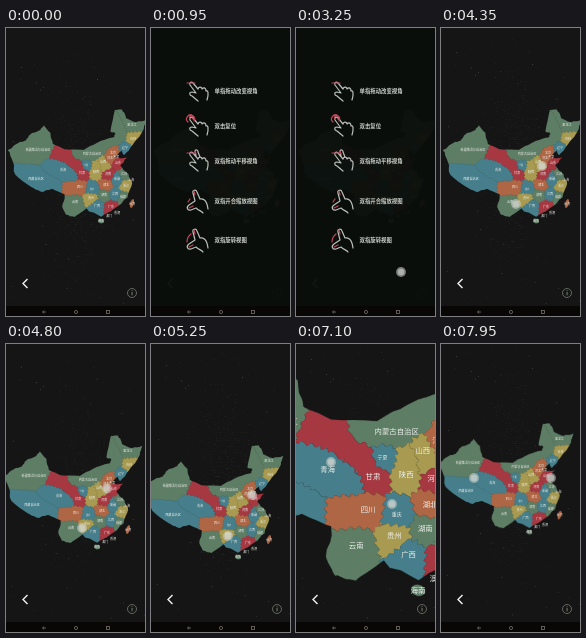
An HTML page with a canvas for the animation above (8 s loop, 139 px wide and 288 px high).

```html
<!DOCTYPE html>
<html lang="zh">
<head>
<meta charset="utf-8">
<title>地图手势</title>
<style>
html, body { margin: 0; width: 100%; height: 100%; overflow: hidden; background: #141514; }
canvas { display: block; width: 100vw; height: 100vh; }
</style>
</head>
<body>
<canvas id="stage"></canvas>
<script>
const W = 139, H = 288, LOOP = 8000;
const FONT = '"Noto Sans CJK SC", "Noto Sans CJK", sans-serif';
const GREEN = [94, 125, 101], BLUE = [70, 127, 139], RED = [166, 56, 66],
  ORANGE = [174, 102, 69], YELLOW = [168, 154, 80];
const canvas = document.getElementById('stage');
const ctx = canvas.getContext('2d');

let seed = 17;
function random() {
  seed = (seed * 16807) % 2147483647;
  return seed / 2147483647;
}
const spread = () => random() + random() + random() - 1.5;
const ramp = (t, from, to) => Math.min(1, Math.max(0, (t - from) / (to - from)));
const mix = (a, b, p) => a + (b - a) * p;
const within = (t, from, to) => t >= from && t <= to;
const toPoints = text => text.split(', ').map(pair => pair.split(' ').map(Number));

// Each province grows around a spine that starts at its label.
const provinces = [
  ['新疆维吾尔自治区', GREEN, '32 122, 42 120'],
  ['西藏自治区', BLUE, '30 151, 46 158'],
  ['青海', BLUE, '57 142, 48 139, 66 147'],
  ['甘肃', RED, '76 145, 70 135, 62 128, 51 124'],
  ['内蒙古自治区', GREEN, '86 126, 70 127, 86 126, 102 116, 113 108, 111 90'],
  ['宁夏', BLUE, '80 137'],
  ['陕西', YELLOW, '90 144, 91 138'],
  ['山西', YELLOW, '97 134, 98 139'],
  ['河北', ORANGE, '104 130, 106 122'],
  ['黑龙江', GREEN, '126 97, 116 87'],
  ['吉林', YELLOW, '127 111'],
  ['辽宁', BLUE, '119 120'],
  ['山东', RED, '112 135'],
  ['河南', RED, '102 146'],
  ['江苏', GREEN, '118 146'],
  ['安徽', BLUE, '111 151'],
  ['湖北', ORANGE, '100 157'],
  ['重庆', BLUE, '86 161'],
  ['四川', ORANGE, '74 159, 66 159'],
  ['云南', GREEN, '69 174, 62 178'],
  ['贵州', YELLOW, '85 170'],
  ['湖南', GREEN, '98 167'],
  ['江西', BLUE, '109 166'],
  ['浙江', YELLOW, '120 158'],
  ['福建', GREEN, '117 169'],
  ['广西', BLUE, '91 178'],
  ['广东', RED, '105 179']
].map(([name, color, spine]) => ({ name, color, spine: toPoints(spine) }));

const islands = [
  { name: '台湾', color: ORANGE, x: 126, y: 175.5, rx: 1.8, ry: 4.5 },
  { name: '海南', color: GREEN, x: 95, y: 193, rx: 3, ry: 2.3 }
];
const coast = toPoints('2 122, 14 114, 20 113, 24 106, 33 103, 38 98, 44 105, 47 116, 58 121, 78 122, 90 115, 108 109, 110 105, 104 103, 109 82, 116 81, 120 90, 130 94, 140 92, 138 101, 127 117, 118 127, 116 122, 108 130, 121 130, 114 138, 122 146, 126 155, 121 169, 114 177, 95 189, 80 181, 68 189, 60 187, 56 179, 59 167, 46 161, 34 164, 25 159, 9 147, 7 134');
const cities = [['北京', 107, 125], ['天津', 110, 129], ['上海', 125, 152], ['香港', 111, 185], ['澳门', 103, 188]];

function segmentDistance(x, y, [ax, ay], [bx, by]) {
  const dx = bx - ax, dy = by - ay;
  const along = ramp((x - ax) * dx + (y - ay) * dy, 0, dx * dx + dy * dy || 1);
  return Math.hypot(x - ax - dx * along, y - ay - dy * along);
}

function spineDistance(x, y, spine) {
  let best = Infinity;
  for (let i = 0; i < spine.length; i++) {
    best = Math.min(best, segmentDistance(x, y, spine[i], spine[Math.min(i + 1, spine.length - 1)]));
  }
  return best;
}

function provinceAt(x, y) {
  const wx = x + .6 * Math.sin(y * 1.9 + 2 * Math.sin(x * .7));
  const wy = y + .6 * Math.sin(x * 1.7 + 2 * Math.sin(y * .8));
  let best = null, least = Infinity;
  for (const p of provinces) {
    const d = spineDistance(wx, wy, p.spine);
    if (d < least) { least = d; best = p; }
  }
  return best;
}

// A closed line roughened by small random steps.
function roughPath(points, steps) {
  const path = new Path2D();
  points.forEach(([ax, ay], i) => {
    const [bx, by] = points[(i + 1) % points.length];
    for (let k = 0; k < steps; k++) {
      path.lineTo(mix(ax, bx, k / steps) + spread() * .7, mix(ay, by, k / steps) + spread() * .7);
    }
  });
  path.closePath();
  return path;
}

const MAP = { y: 76, w: 146, h: 124, detail: 4 };

function buildMap() {
  const sheet = document.createElement('canvas');
  const w = sheet.width = MAP.w * MAP.detail;
  const h = sheet.height = MAP.h * MAP.detail;
  const pen = sheet.getContext('2d');
  const image = pen.createImageData(w, h);
  const above = [];
  for (let j = 0; j < h; j++) {
    let left = null;
    for (let i = 0; i < w; i++) {
      const here = provinceAt(i / MAP.detail, MAP.y + j / MAP.detail);
      const border = i && j && (here !== left || here !== above[i]);
      const shade = border ? .78 : 1;
      image.data.set([...here.color.map(c => c * shade), 255], (j * w + i) * 4);
      left = above[i] = here;
    }
  }
  pen.putImageData(image, 0, 0);
  pen.scale(MAP.detail, MAP.detail);
  pen.translate(0, -MAP.y);
  pen.globalCompositeOperation = 'destination-in';
  pen.fill(roughPath(coast, 4));
  pen.globalCompositeOperation = 'source-over';
  for (const { color, x, y, rx, ry } of islands) {
    pen.fillStyle = `rgb(${color})`;
    pen.beginPath();
    pen.ellipse(x, y, rx, ry, .25, 0, Math.PI * 2);
    pen.fill();
  }
  return sheet;
}
const mapSheet = buildMap();

const labels = [
  ...provinces.map(p => [p.name, ...p.spine[0]]),
  ...islands.map(p => [p.name, p.x, p.y]),
  ...cities
];
const narrow = ['宁夏', '重庆'];

function drawMap(t) {
  const pan = ramp(t, 4350, 5250), zoom = ramp(t, 5900, 7000), back = ramp(t, 7150, 7550);
  const pose = (moved, near, end) => mix(mix(moved * pan, near, zoom), end, back);
  const scale = mix(mix(1, 2.38, zoom), .975, back);
  ctx.save();
  ctx.translate(pose(-8, -104, -4.3), pose(20, -213, 0));
  ctx.scale(scale, scale);
  ctx.imageSmoothingQuality = 'high';
  ctx.drawImage(mapSheet, 0, MAP.y, MAP.w, MAP.h);
  ctx.fillStyle = '#eef0ec';
  ctx.textAlign = 'center';
  for (const [name, x, y] of labels) {
    ctx.font = `500 ${narrow.includes(name) ? 2.1 : 3.1}px ${FONT}`;
    ctx.fillText(name, x, y);
  }
  ctx.restore();
}

const dots = Array.from({ length: 600 }, () => ({
  x: 71 + spread() * 34, y: 150 + spread() * 100, alpha: .04 + random() * .12
}));
const stars = Array.from({ length: 36 }, () => ({
  x: random() * W, y: 30 + random() * 270, alpha: .12 + random() * .25
}));

function drawDust(t) {
  const rise = t * .0034;
  ctx.fillStyle = '#a5a89a';
  for (const { x, y, alpha } of dots) {
    ctx.globalAlpha = alpha;
    ctx.fillRect(x, Math.round(y / 2) * 2 - rise, 1, .7);
  }
  for (const { x, y, alpha } of stars) {
    ctx.globalAlpha = alpha;
    ctx.fillRect(x, y - rise, .9, .9);
  }
  ctx.globalAlpha = 1;
}

function circle(x, y, r) {
  ctx.beginPath();
  ctx.arc(x, y, r, 0, Math.PI * 2);
}

function drawControls() {
  ctx.strokeStyle = '#f2f2f2';
  ctx.lineWidth = 1.4;
  ctx.stroke(new Path2D('M21.5 251L17 255.5L21.5 260'));
  ctx.strokeStyle = ctx.fillStyle = '#858a80';
  ctx.lineWidth = .7;
  circle(126, 265, 4.5);
  ctx.stroke();
  ctx.fillRect(125.6, 264, .9, 3.3);
  ctx.fillRect(125.6, 262.3, .9, .9);
}

const PALM = 'L11 15L7 14C4 14 4 17 7 18L13 23M13 11C14 8 17 9 17 11C19 9 21 10 21 13C23 12 24 15 22 22';
const POINT = 'M13 11L8 5C6 3 4 5 5 7' + PALM;
const PAIR = POINT + 'M11 8L10 3C11 1 13 2 13 4L15 9';
const PINCH = 'M15 11L12 4C11 1 7 2 8 5L10 13L4 17C1 19 2 23 6 22L11 20C14 23 17 23 18 25M15 11C19 10 22 13 23 21';
const PINCH_TIPS = 'M9 3L10 7M4 20L8 18';
const hints = [
  ['单指拖动改变视角', 63, POINT, 'M2 5H10'],
  ['双击复位', 98, POINT, 'M3 9A4 4 0 1 1 9 8M5 6A2 2 0 1 1 8 6'],
  ['双指拖动平移视角', 133, PAIR, 'M2 5H10M10 3L11 6'],
  ['双指开合缩放视图', 173, PINCH, PINCH_TIPS + 'M3 14L5 11'],
  ['双指旋转视图', 212, PINCH, PINCH_TIPS + 'M2 15Q2 10 6 7']
].map(([label, y, hand, mark]) => ({ label, y, hand: new Path2D(hand), mark: new Path2D(mark) }));

function drawHints(t) {
  const shown = ramp(t, 720, 880) - ramp(t, 3350, 3550);
  if (!shown) return;
  ctx.save();
  ctx.globalAlpha = shown * .96;
  ctx.fillStyle = '#0a0e0b';
  ctx.fillRect(0, 0, W, 278);
  ctx.globalAlpha = shown;
  ctx.font = '700 5.4px ' + FONT;
  ctx.textAlign = 'left';
  ctx.lineCap = ctx.lineJoin = 'round';
  for (const { label, y, hand, mark } of hints) {
    ctx.fillStyle = '#cdd0cb';
    ctx.fillText(label, 63.5, y);
    ctx.save();
    ctx.translate(34, y - 13);
    ctx.lineWidth = 1.2;
    ctx.strokeStyle = '#bcc0bb';
    ctx.stroke(hand);
    ctx.strokeStyle = '#c2465a';
    ctx.stroke(mark);
    ctx.restore();
  }
  ctx.restore();
}

function drawNav() {
  ctx.fillStyle = '#090606';
  ctx.fillRect(0, 278, W, 10);
  ctx.strokeStyle = '#77706a';
  ctx.lineWidth = .8;
  ctx.stroke(new Path2D('M40 284H36.5L38.2 282.5M36.5 284L38.2 285.5'));
  circle(70, 284, 1.6);
  ctx.stroke();
  ctx.strokeRect(100.5, 282.5, 3, 3);
}

function drawTouch(x, y) {
  ctx.fillStyle = 'rgba(215,217,212,.55)';
  circle(x, y, 4.9);
  ctx.fill();
  circle(x, y, 3.2);
  ctx.fill();
}

function drawTouches(t) {
  if (within(t, 480, 680)) drawTouch(126, 265);
  if (within(t, 3150, 3350)) drawTouch(105, 244);
  if (within(t, 4200, 5500)) {
    const pan = ramp(t, 4350, 5250);
    drawTouch(101, mix(138, 151, pan));
    drawTouch(mix(75, 77, pan), mix(176, 192, pan));
  }
  if (within(t, 5800, 7550)) {
    const apart = ramp(t, 5900, 7000) - ramp(t, 7150, 7550);
    drawTouch(mix(56, 35, apart), mix(132, 118, apart));
    drawTouch(mix(79, 96, apart), mix(149, 160, apart));
  }
  if (t >= 7750) {
    drawTouch(33, 134);
    drawTouch(110, 134);
  }
}

function draw(t) {
  const ratio = window.devicePixelRatio || 1;
  const width = Math.round(innerWidth * ratio), height = Math.round(innerHeight * ratio);
  if (canvas.width !== width || canvas.height !== height) {
    canvas.width = width;
    canvas.height = height;
  }
  ctx.setTransform(width / W, 0, 0, height / H, 0, 0);
  ctx.textBaseline = 'middle';
  ctx.fillStyle = '#141514';
  ctx.fillRect(0, 0, W, H);
  drawDust(t);
  drawMap(t);
  drawControls();
  drawHints(t);
  drawNav();
  drawTouches(t);
}

const start = performance.now();
function tick() {
  draw((performance.now() - start) % LOOP);
  requestAnimationFrame(tick);
}
tick();
</script>
</body>
</html>
```
